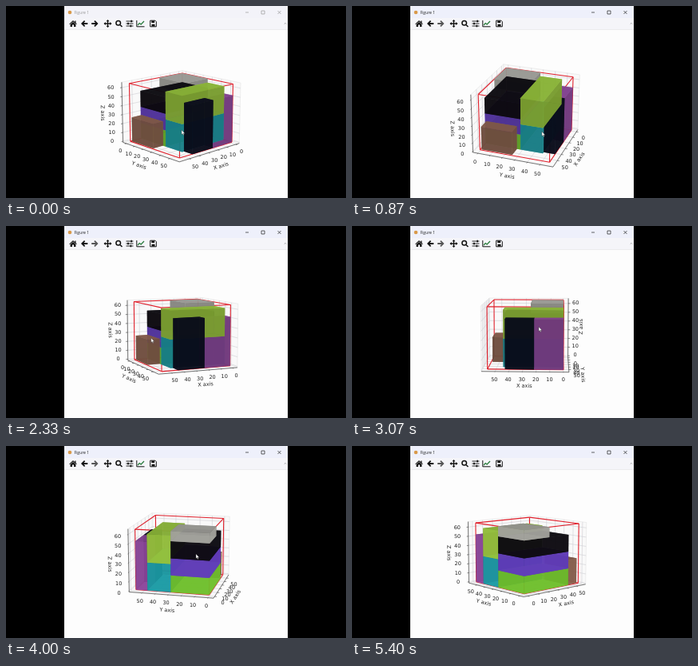
These frames come from a looping animation (426 px wide and 240 px high, 5470 ms). An HTML page with a canvas:

```html
<!DOCTYPE html>
<html>
<head>
<meta charset="utf-8">
<style>
html, body { margin: 0; width: 100%; height: 100%; overflow: hidden; background: #000; }
canvas { display: block; width: 426px; height: 240px; }
</style>
</head>
<body>
<canvas id="stage"></canvas>
<script>
const canvas = document.getElementById('stage');
const ratio = window.devicePixelRatio || 1;
canvas.width = 426 * ratio;
canvas.height = 240 * ratio;
const g = canvas.getContext('2d');

const LOOP = 5470, STEP = 1000 / 15;
const SIZE = [56, 56, 64.5];          // red container, in data units
const BOX = [1.039, 1.039, 0.857];    // the same in view units
const LOW = [-4.1, -4.1, -1.3], HIGH = [60.1, 60.1, 65.8];
const FONT = '"DejaVu Sans", sans-serif';

// time, azimuth, elevation, cursor x, cursor y
const KEYS = [
  [0, 46.5, 15, 220, 157],
  [870, 20, 25.5, 238, 159],
  [1470, -14, 6, 262, 138],
  [2330, 65.5, 7.5, 182, 142],
  [2650, 82, 8, 168, 139],
  [3070, 92.75, 8, 234, 128],
  [3500, 146, 11, 188, 130],
  [4000, 193.6, 14, 238, 137],
  [5400, 228, 9.5, 207, 134]
];

// low corner, high corner, lit colour
const BOXES = [
  [[0, 0, 0], [45, 29, 18], [112, 192, 45]],
  [[0, 0, 18], [45, 29, 36], [98, 60, 190]],
  [[0, 0, 36], [45, 29, 54], [14, 12, 18]],
  [[0, 0, 54], [25, 29, 64.5], [166, 166, 160]],
  [[45, 1, 0], [55, 26, 27], [138, 96, 78]],
  [[0, 29, 0], [45, 47, 30], [28, 155, 165]],
  [[0, 29, 30], [45, 47, 60], [150, 195, 60]],
  [[21.5, 47, 0], [43, 56, 52], [12, 14, 32]],
  [[0, 47, 0], [21.5, 56, 52], [140, 70, 155]]
];

// Monotone cubic through the keys
function sample(t, col) {
  const last = KEYS.length - 1;
  const slope = i => (KEYS[i + 1][col] - KEYS[i][col]) / (KEYS[i + 1][0] - KEYS[i][0]);
  const tangent = i => {
    if (i === 0 || i === last) return 0;
    const a = slope(i - 1), b = slope(i);
    return a * b > 0 ? 2 * a * b / (a + b) : 0;
  };
  if (t >= KEYS[last][0]) return KEYS[last][col];
  let i = 0;
  while (t >= KEYS[i + 1][0]) i++;
  const h = KEYS[i + 1][0] - KEYS[i][0], u = (t - KEYS[i][0]) / h, v = 1 - u;
  return KEYS[i][col] * v * v * (1 + 2 * u) + KEYS[i + 1][col] * u * u * (3 - 2 * u)
    + h * u * v * (v * tangent(i) - u * tangent(i + 1));
}

function makeCamera(azimuth, elevation) {
  const a = azimuth * Math.PI / 180, e = elevation * Math.PI / 180;
  const ca = Math.cos(a), sa = Math.sin(a), ce = Math.cos(e), se = Math.sin(e);
  const toEye = [ca * ce, sa * ce, se];
  const toView = p => p.map((v, i) => (v / SIZE[i] - 0.5) * BOX[i]);
  const depth = p => toView(p).reduce((d, v, i) => d - v * toEye[i], 10);
  return {
    eye: toEye.map((n, i) => (10 * n / BOX[i] + 0.5) * SIZE[i]),
    depth,
    project(p) {
      const [x, y, z] = toView(p);
      const out = x * ca + y * sa, scale = 875 / depth(p);
      return [219.3 + scale * (y * ca - x * sa), 133.8 - scale * (z * ce - out * se)];
    }
  };
}

function trace(points) {
  g.beginPath();
  points.forEach(p => g.lineTo(...p));
}

function line(points, color, width) {
  trace(points);
  g.strokeStyle = color;
  g.lineWidth = width;
  g.stroke();
}

function text(str, x, y, angle = 0) {
  g.save();
  g.translate(x, y + 0.7);
  g.rotate(angle);
  g.font = `6.5px ${FONT}`;
  g.fillStyle = '#222';
  g.fillText(str, 0, 0);
  g.restore();
}

const put = (p, axis, value) => p.map((v, i) => i === axis ? value : v);

// Four corners of the face at p[axis], spanned between lo and hi
function face(lo, hi, axis, value) {
  const [b, c] = [0, 1, 2].filter(i => i !== axis);
  return [[lo, lo], [hi, lo], [hi, hi], [lo, hi]].map(([m, n]) =>
    put(put(put(lo, axis, value), b, m[b]), c, n[c]));
}

const ticks = axis => Array.from({ length: axis === 2 ? 7 : 6 }, (_, i) => i * 10);

function drawAxes(cam) {
  const near = cam.eye.map((v, i) => v > SIZE[i] / 2 ? HIGH[i] : LOW[i]);
  const far = near.map((v, i) => LOW[i] + HIGH[i] - v);
  const project = cam.project;

  for (let axis = 0; axis < 3; axis++) {
    trace(face(LOW, HIGH, axis, far[axis]).map(project));
    g.closePath();
    g.fillStyle = '#f9f9f9';
    g.fill();
    g.strokeStyle = '#dedede';
    g.lineWidth = 0.5;
    g.stroke();
  }
  for (let axis = 0; axis < 3; axis++) {
    const [b, c] = [0, 1, 2].filter(i => i !== axis);
    for (const v of ticks(axis)) {
      const corner = put(far, axis, v);
      line([put(corner, b, near[b]), corner, put(corner, c, near[c])].map(project), '#cfcfd4', 0.6);
    }
  }

  g.textAlign = 'center';
  g.textBaseline = 'middle';
  for (let axis = 0; axis < 3; axis++) {
    const flip = axis === 0 ? 1 : 0;
    const edge = put(far, flip, near[flip]);
    const outward = d => edge.map((v, i) => i === axis ? v : v + (v > SIZE[i] / 2 ? d : -d));
    const from = project(put(edge, axis, LOW[axis])), to = project(put(edge, axis, HIGH[axis]));
    line([from, to], '#222', 0.6);
    for (const v of ticks(axis)) {
      const p = put(edge, axis, v);
      line([p, put(p, flip, p[flip] + (p[flip] > 28 ? 1.6 : -1.6))].map(project), '#222', 0.5);
      text(v, ...project(put(outward(6), axis, v)));
    }
    let angle = Math.atan2(to[1] - from[1], to[0] - from[0]);
    if (angle > Math.PI / 2) angle -= Math.PI;
    if (angle < -Math.PI / 2) angle += Math.PI;
    text('XYZ'[axis] + ' axis', ...project(put(outward(11), axis, SIZE[axis] / 2)), angle);
  }
}

function drawContainer(cam) {
  const zero = [0, 0, 0];
  for (let axis = 0; axis < 3; axis++) {
    for (const p of face(zero, SIZE, axis, 0)) {
      line([p, put(p, axis, SIZE[axis])].map(cam.project), '#e0202c', 1.1);
    }
  }
}

// Whole boxes are ordered by their nearest corner, so some overlap like a plotting library's
function drawBoxes(cam) {
  const nearest = ([lo, hi]) => cam.depth(lo.map((v, i) => cam.eye[i] > SIZE[i] / 2 ? hi[i] : v));
  const ordered = BOXES.slice().sort((a, b) => nearest(b) - nearest(a));
  for (const [lo, hi, color] of ordered) {
    const paint = (axis, upper) => {
      const light = !upper ? 1 : axis === 2 ? 0.9 : 0.77;
      trace(face(lo, hi, axis, (upper ? hi : lo)[axis]).map(cam.project));
      g.fillStyle = `rgba(${color.map(c => Math.round(c * light))},0.82)`;
      g.fill();
    };
    const visible = (axis, upper) => upper ? cam.eye[axis] > hi[axis] : cam.eye[axis] < lo[axis];
    for (const front of [false, true]) {
      for (let axis = 0; axis < 3; axis++) {
        for (const upper of [false, true]) {
          if (visible(axis, upper) === front) paint(axis, upper);
        }
      }
    }
  }
}

function icon(path, x, color = '#111', width = 0) {
  g.save();
  g.translate(x, 22);
  g.fillStyle = g.strokeStyle = color;
  g.lineWidth = width;
  g[width ? 'stroke' : 'fill'](new Path2D(path));
  g.restore();
}

function drawWindow(active) {
  const ink = active ? '#222' : '#999';
  g.fillStyle = '#000';
  g.fillRect(0, 0, 426, 240);
  g.fillStyle = '#fdfdfd';
  g.fillRect(73, 0, 280, 240);
  g.fillStyle = active ? '#eef0fb' : '#f3f3f9';
  g.fillRect(73, 0, 280, 15);
  g.fillStyle = '#f5f5f9';
  g.fillRect(73, 15, 280, 14.5);
  g.fillStyle = '#e4e4e6';
  g.fillRect(73, 29.3, 280, 0.6);

  g.fillStyle = '#d99a4a';
  g.beginPath();
  g.arc(80, 8, 2.3, 0, 7);
  g.fill();
  g.textAlign = 'left';
  g.textBaseline = 'middle';
  g.font = '5px "Open Sans", sans-serif';
  g.fillStyle = ink;
  g.fillText('Figure 1', 85.5, 8.2);
  line([[300, 8], [304, 8]], ink, 0.7);
  g.strokeRect(320, 6, 4, 4);
  line([[340.5, 6], [344.5, 10]], ink, 0.7);
  line([[344.5, 6], [340.5, 10]], ink, 0.7);

  const arrow = 'M-4 0L0-4L1.3-2.8L-.6-.9H4.3V.9H-.6L1.3 2.8L0 4Z';
  icon('M-4.8 .4L0-4L2.2-2.1V-3.6H3.5V-1L4.8 .4L4.1 1.1L0-2.6L-4.1 1.1ZM-3.4 1L0-2L3.4 1V4H1V1.5H-1V4H-3.4Z', 84);
  icon(arrow, 98);
  g.save();
  g.translate(222.5, 0);
  g.scale(-1, 1);
  icon(arrow, 111, active ? '#555' : '#111');
  g.restore();
  icon('M-4 0H4M0-4V4', 127.5, '#111', 1.3);
  icon('M0-5L2-2.8H-2ZM0 5L2 2.8H-2ZM-5 0L-2.8-2V2ZM5 0L2.8-2V2Z', 127.5);
  icon('M2-.8A2.8 2.8 0 1 1-3.6-.8A2.8 2.8 0 1 1 2-.8M1.2 1.2L4 4', 141.5, '#111', 1.5);
  icon('M-4.5-3H4.5M-4.5 0H4.5M-4.5 3H4.5', 155, '#111', 0.9);
  icon('M1.3-4.3H3V-1.7H1.3ZM-2.8-1.3H-1.1V1.3H-2.8ZM.5 1.7H2.2V4.3H.5Z', 155);
  icon('M-4.7-4V3.8H5', 168.5, '#111', 1);
  icon('M-3.5 2L-1.2-.6L.6 1L4.5-3', 168.5, '#267a3a', 1.2);
  icon('M-3.8-3.8H2.4L3.8-2.4V3.8H-3.8Z', 184.5, '#111', 1);
  icon('M-2.2-3.5H1.6V-1H-2.2ZM-2 .8H2V3.6H-2Z', 184.5);
  icon('M-1.3 .6L0-.7L1.3 .6', 350, '#777', 0.6);
}

function drawCursor(x, y) {
  g.save();
  g.translate(x, y);
  const shape = new Path2D('M0-2V3.6L1.3 2.5L2.2 4.4L3.1 4L2.2 2.2H4Z');
  g.fillStyle = '#fff';
  g.strokeStyle = '#333';
  g.lineWidth = 0.4;
  g.fill(shape);
  g.stroke(shape);
  g.restore();
}

function draw(t) {
  g.setTransform(ratio, 0, 0, ratio, 0, 0);
  g.lineJoin = 'round';
  const cam = makeCamera(sample(t, 1), sample(t, 2));
  drawWindow(t > 300);
  drawAxes(cam);
  drawContainer(cam);
  drawBoxes(cam);
  if (t < 5000) drawCursor(sample(t, 3), sample(t, 4));
}

const start = performance.now();
function tick() {
  const t = (performance.now() - start) % LOOP;
  draw(Math.floor((t + 4) / STEP) * STEP);
  requestAnimationFrame(tick);
}
tick();
</script>
</body>
</html>
```
